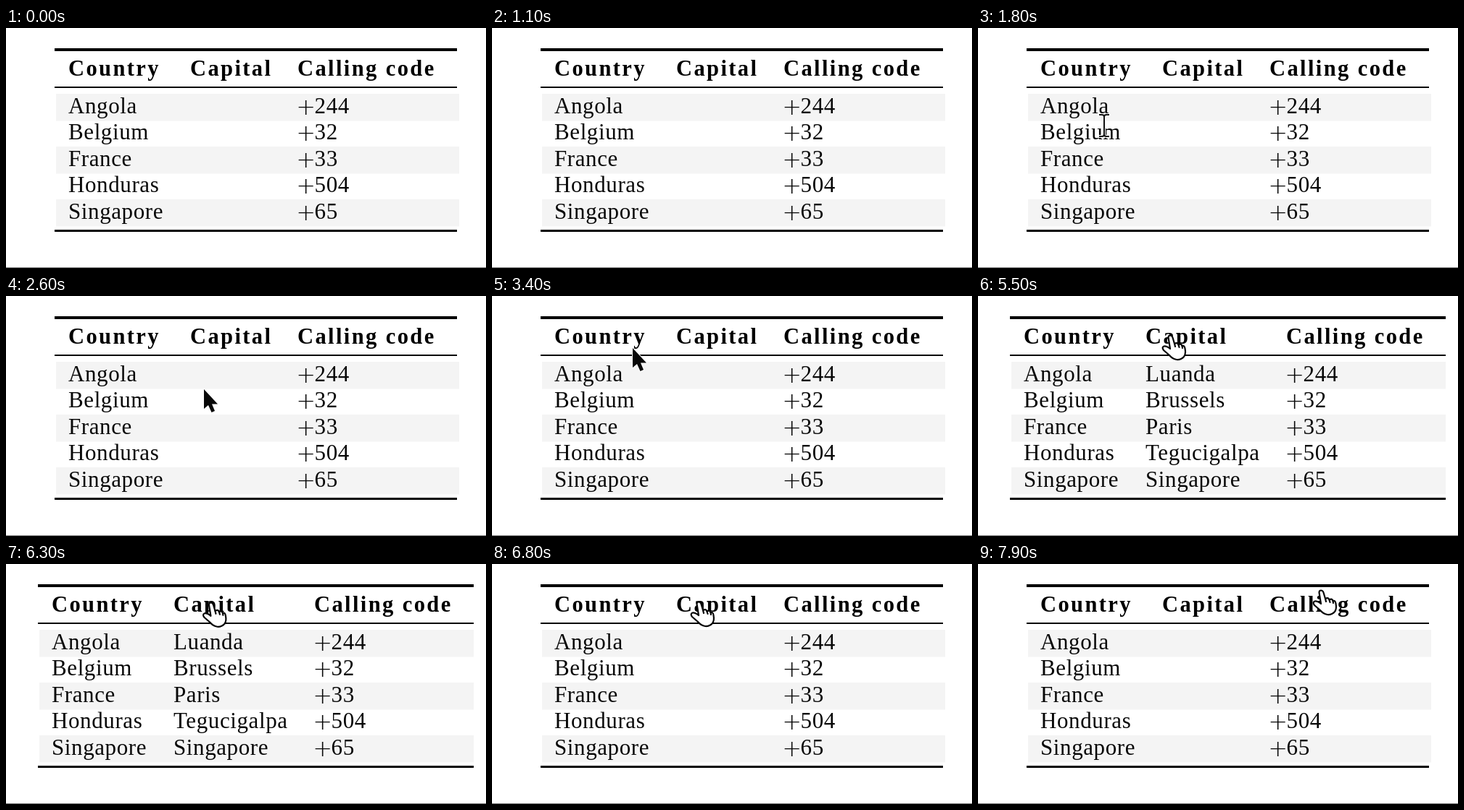
Animation of 662x332 px, one loop 8 s. Source, as an HTML page:

```html
<!DOCTYPE html>
<html lang="en">
<head>
<meta charset="utf-8">
<title>Country table</title>
<style>
  html, body { margin: 0; width: 100%; height: 100%; overflow: hidden; background: #fff; }
  svg { display: block; width: 662px; height: 332px; }
  text { font: 31px "Liberation Serif", serif; letter-spacing: .6px; fill: #080808; white-space: pre; }
  .head { font-weight: bold; font-size: 30.5px; letter-spacing: 2.4px; fill: #000; }
  .plus { font: 200 32px "DejaVu Sans", sans-serif; }
</style>
</head>
<body>
<svg viewBox="0 0 662 332">
  <g id="table"></g>
  <rect y="331" width="662" height="1" fill="#777"/>
  <path id="arrow" d="M0 0V27L6 22L10.500 32L15 30L11 20.500H19Z" fill="#080808" stroke="#fff" stroke-width="2" stroke-linejoin="round" paint-order="stroke"/>
  <g id="ibeam" fill="none" stroke-linecap="square">
    <path id="beam" d="M-6 -15H-3Q0 -15 0 -12Q0 -15 3 -15H6M0 -12V12M-6 15H-3Q0 15 0 12Q0 15 3 15H6"/>
  </g>
  <g id="hand" fill="#fff" stroke="#080808" stroke-width="2.200" stroke-linejoin="round" stroke-linecap="round">
    <path d="M-3.500 2.500Q-3.500 -.5 -1 -.5Q1.500 -.5 2.500 2.500L5 11Q9 8.500 10.500 12.500Q14 10 15.500 14Q19 13 19.500 18Q21 25 18 29Q14 33.500 8 33Q2 32 -2 27L-10 20Q-13 16 -9.500 14.500Q-6 14 -1 18Z"/>
    <path d="M5 11L6 15M10.500 12.500L11.500 16M15.500 14L16 17" fill="none"/>
  </g>
</svg>
<script>
const LOOP = 8000, STEP = 100, SHOW = 4100, HIDE = 6800, ENTER = 1100;
const countries = [
  ["Angola", "Luanda", 244],
  ["Belgium", "Brussels", 32],
  ["France", "Paris", 33],
  ["Honduras", "Tegucigalpa", 504],
  ["Singapore", "Singapore", 65],
];
const layouts = {
  narrow: { left: 67, right: 622, stripe: [69, 625], cols: [86, 254, 402], ends: [212, 365, 591] },
  wide: { left: 44, right: 645, stripe: [46, 645], cols: [63, 231, 425], ends: [189, 342, 614] },
};
// time, x, y of the pointer's hot spot
const path = [
  [ENTER, -20, 112], [1500, 54, 122], [1800, 174, 135], [2200, 258, 132],
  [2600, 273, 129], [2900, 262, 118], [3400, 194, 72], [3900, 182, 55],
  [4600, 182, 55], [5100, 224, 48], [5500, 266, 55], [5900, 276, 56],
  [6500, 286, 53], [6900, 286, 53], [7300, 370, 22], [7600, 432, 11],
  [7900, 474, 37], [8000, 474, 37],
];

const byId = id => document.getElementById(id);
const rect = (x, y, w, h, fill) => `<rect x="${x}" y="${y}" width="${w}" height="${h}" fill="${fill}"/>`;
const label = (x, y, body, cls = "") => `<text x="${x}" y="${y}" class="${cls}">${body}</text>`;

function tableMarkup(name) {
  const { left, right, stripe, cols } = layouts[name];
  let out = "";
  countries.forEach(([country, capital, code], i) => {
    const y = 117.5 + 36.5 * i;
    if (i % 2 === 0) out += rect(stripe[0], 91 + 36.5 * i, stripe[1] - stripe[0], 37.5, "#f4f4f4");
    out += label(cols[0], y, country);
    if (name === "wide") out += label(cols[1], y, capital);
    out += label(cols[2], y, `<tspan class="plus" dx="-1.8" dy="2.4">+</tspan><tspan dx="-2" dy="-2.4">${code}</tspan>`);
  });
  ["Country", "Capital", "Calling code"].forEach((s, i) => out += label(cols[i], 65.5, s, "head"));
  for (const [y, h] of [[28, 4], [81, 2], [279, 3]]) out += rect(left, y, right - left, h, "#000");
  return out;
}

function pointerAt(t) {
  const i = Math.max(1, path.findIndex(key => key[0] >= t));
  const [t0, x0, y0] = path[i - 1], [t1, x1, y1] = path[i];
  const p = Math.max(0, (t - t0) / (t1 - t0));
  const e = p * p * (3 - 2 * p);
  return [x0 + (x1 - x0) * e, y0 + (y1 - y0) * e];
}

function pointerKind(x, y, { cols, ends }) {
  const overHeader = y > 34 && y < 70 && cols.some((c, i) => x >= c && x <= ends[i]);
  if (overHeader) return "hand";
  return y > 91 && y < 275 && x >= cols[0] && x <= 217 ? "ibeam" : "arrow";
}

let shown;
function draw(now) {
  const t = Math.floor(now % LOOP / STEP) * STEP;
  const name = t >= SHOW && t < HIDE ? "wide" : "narrow";
  if (name !== shown) {
    byId("table").innerHTML = tableMarkup(name);
    shown = name;
  }
  const [x, y] = pointerAt(t);
  const kind = t < ENTER ? "" : pointerKind(x, y, layouts[name]);
  for (const id of ["arrow", "ibeam", "hand"]) {
    byId(id).style.display = id === kind ? "" : "none";
    byId(id).setAttribute("transform", `translate(${x} ${y})`);
  }
}

// The text pointer is a dark line over a wider white one.
const beam = byId("beam"), core = beam.cloneNode();
core.removeAttribute("id");
beam.style.cssText = "stroke: #fff; stroke-width: 4px";
core.style.cssText = "stroke: #111; stroke-width: 2px";
beam.after(core);

const start = performance.now();
function tick() {
  draw(performance.now() - start);
  requestAnimationFrame(tick);
}
tick();
</script>
</body>
</html>
```
